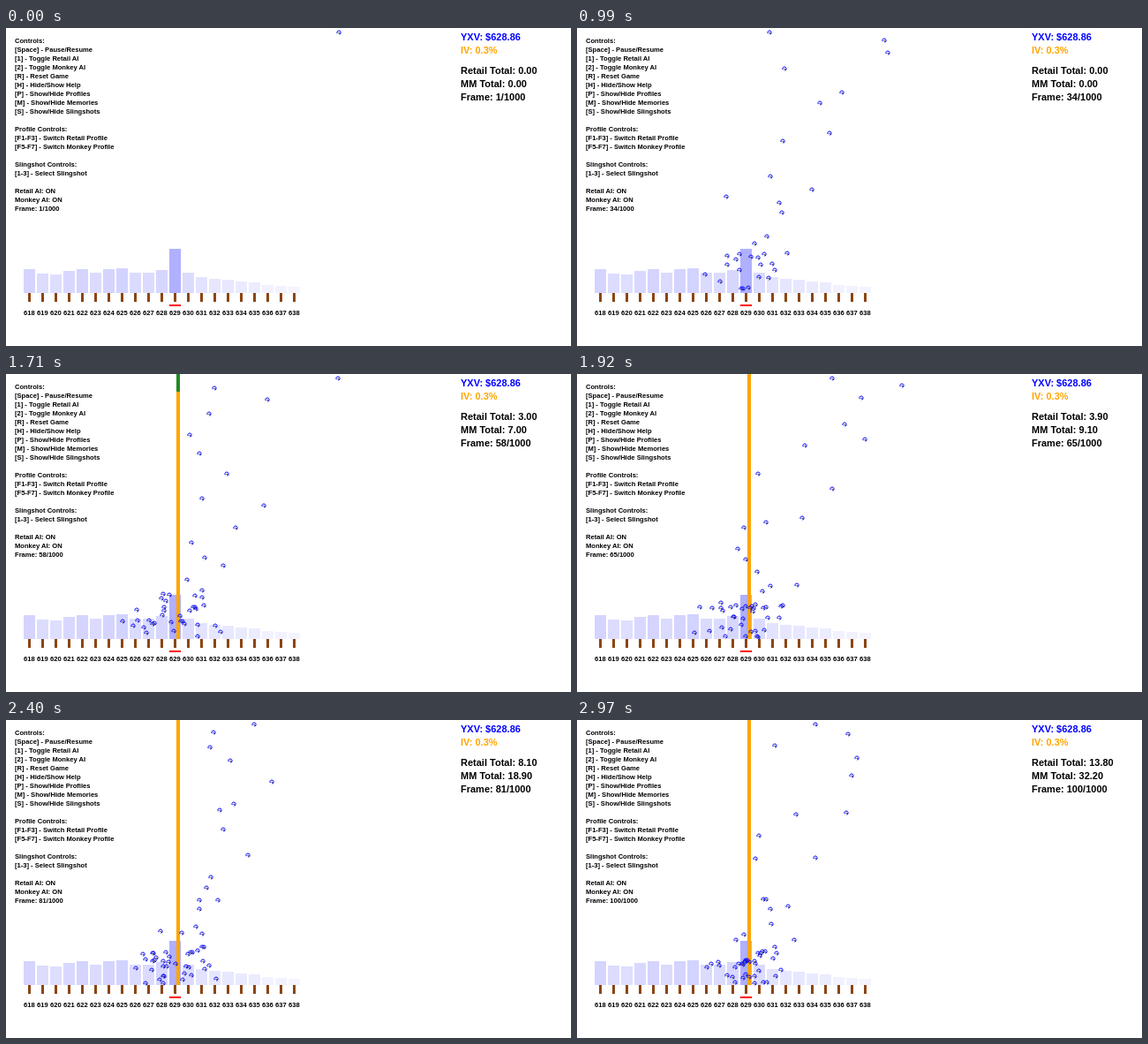
Recreate the animation shown at these times as an HTML page. Size 640 by 360 pixels, loop 3 s.

```html
<!DOCTYPE html>
<html lang="en">
<head>
<meta charset="utf-8">
<title>Order flow</title>
<style>
  html, body { margin: 0; width: 100%; height: 100%; overflow: hidden; background: #fff; }
  svg { display: block; font: bold 7.58px "Liberation Sans", Arial, sans-serif; white-space: pre; }
  .stats { font-size: 11px; }
</style>
</head>
<body>
<svg id="stage" width="640" height="360" viewBox="0 0 640 360">
  <defs>
    <g id="ball" fill="none">
      <path d="M-1.8 1.2A2.1 2.1 0 1 1 .4 2.2" stroke="#00f"/>
      <path d="M-.6 .4H.8V1.6" stroke="#223" stroke-width=".8"/>
    </g>
  </defs>
</svg>
<script>
const stage = document.getElementById('stage');
const STEP = 30, FRAMES = 100, GROUND = 300;

function add(tag, attrs, text = '') {
  const el = document.createElementNS('http://www.w3.org/2000/svg', tag);
  for (const key in attrs) el.setAttribute(key, attrs[key]);
  el.textContent = text;
  return stage.appendChild(el);
}
const rect = (x, y, width, height, fill) => add('rect', { x, y, width, height, fill });

// Help panel
const help = `Controls:
[Space] - Pause/Resume
[1] - Toggle Retail AI
[2] - Toggle Monkey AI
[R] - Reset Game
[H] - Hide/Show Help
[P] - Show/Hide Profiles
[M] - Show/Hide Memories
[S] - Show/Hide Slingshots

Profile Controls:
[F1-F3] - Switch Retail Profile
[F5-F7] - Switch Monkey Profile

Slingshot Controls:
[1-3] - Select Slingshot

Retail AI: ON
Monkey AI: ON
Frame:`.split('\n').map((line, i) => add('text', { x: 10, y: 16.5 + 10 * i }, line));
const helpFrame = help[help.length - 1];

// Price, volatility and totals
const stat = (y, fill, text) => add('text', { x: 515, y, fill, class: 'stats' }, text);
stat(14, '#00f', 'YXV: $628.86');
stat(29, '#ffa500', 'IV: 0.3%');
const [retailText, makerText, frameText] = [52, 67, 82].map(y => stat(y, '#000'));

// Strike histogram
[27, 22, 21, 25, 27, 23, 27, 28, 23, 23, 26, 50, 23, 18, 16, 15, 13, 12, 9, 8, 7].forEach((h, i) => {
  const x = 20 + 15 * i, shade = Math.round(255 - 1.58 * h);
  rect(x, GROUND - h, 13, h, `rgb(${shade},${shade},255)`);
  rect(x + 5, GROUND, 3, 10, '#8b4513');
  add('text', { x: x + 6.3, y: 325, 'text-anchor': 'middle' }, 618 + i);
});
rect(185, 313, 13, 2, '#f00');

const retailBar = rect(193, 0, 4, 0, '#228b22');
const makerBar = rect(193, 0, 4, 0, '#ffa500');

const fract = v => v - Math.floor(v);
const rand = (k, i) => fract(Math.sin(k * 12.9898 + i * 78.233) * 43758.5453);

// One ball enters per step at the top and drifts towards the strike
const balls = Array.from({ length: FRAMES }, (_, i) => ({
  born: i + 1,
  from: 215 + 165 * fract(0.982 + 0.618034 * i * i),
  to: 130 + 57 * (rand(i, 1) + rand(i, 2)),
  pace: 9.5 * (0.88 + 0.24 * rand(i, 3)),
  phase: 2 * Math.PI * rand(i, 4),
  el: add('use', { href: '#ball' })
}));

function placeBall(ball, n, gone) {
  const visible = n >= ball.born && ball.born > gone;
  ball.el.setAttribute('visibility', visible ? 'visible' : 'hidden');
  if (!visible) return;
  const p = 1 - Math.exp(-(((n - ball.born) / ball.pace) ** 1.5));
  const loose = Math.max(0, p - 0.85) / 0.15; // settled balls jostle
  const x = ball.from + (ball.to - ball.from) * p + 8 * loose * Math.sin(n * 0.19 + ball.phase * 2);
  const y = 5 + 275 * p + 18 * loose * Math.sin(n * 0.33 + ball.phase);
  ball.el.setAttribute('transform', `translate(${Math.round(x)} ${Math.round(y)})`);
}

// Balls absorbed so far: key points of step and count
const absorbed = [[1, 0], [46, 0], [58, 10], [72, 17], [89, 36], [100, 46]];
function goneAt(n) {
  const i = Math.max(1, absorbed.findIndex(([step]) => step >= n));
  const [a, u] = absorbed[i - 1], [b, v] = absorbed[i];
  return Math.floor(u + (v - u) * (n - a) / (b - a) + 1e-6);
}

function setBar(bar, bottom, height) {
  bar.setAttribute('y', bottom - height);
  bar.setAttribute('height', height);
}

let shown = 0;
function draw(time) {
  const n = Math.floor(time / STEP) % FRAMES + 1;
  if (n === shown) return;
  shown = n;
  const gone = goneAt(n), retail = gone * 0.3, maker = gone * 0.7;
  helpFrame.textContent = frameText.textContent = `Frame: ${n}/1000`;
  retailText.textContent = `Retail Total: ${retail.toFixed(2)}`;
  makerText.textContent = `MM Total: ${maker.toFixed(2)}`;
  setBar(makerBar, GROUND, 40 * maker);
  setBar(retailBar, GROUND - 40 * maker, 40 * retail);
  balls.forEach(ball => placeBall(ball, n, gone));
}

const origin = performance.now();
function tick() {
  draw(performance.now() - origin);
  requestAnimationFrame(tick);
}
tick();
</script>
</body>
</html>
```
